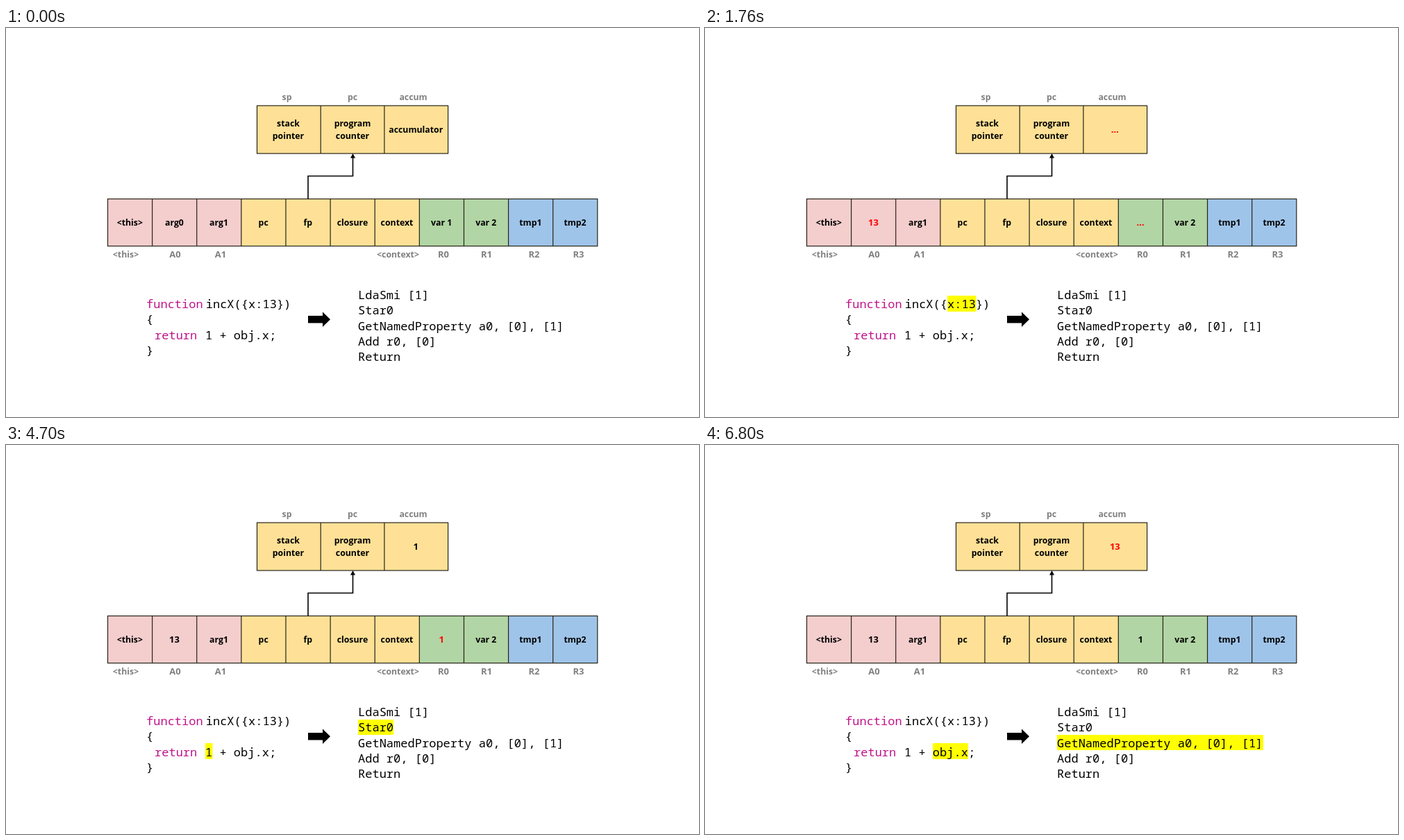
Recreate the animation shown at these times as an HTML page with a canvas. Size 998 by 561 pixels, loop 8000 ms.

```html
<!DOCTYPE html>
<html lang="en">
<head>
<meta charset="utf-8">
<title>Register machine</title>
<style>
html, body { margin: 0; width: 100%; height: 100%; overflow: hidden; background: #fff; }
canvas { display: block; width: 998px; height: 561px; }
</style>
</head>
<body>
<canvas id="stage"></canvas>
<script>
const canvas = document.getElementById('stage');
const ratio = window.devicePixelRatio || 1;
canvas.width = Math.round(998 * ratio);
canvas.height = Math.round(561 * ratio);
const ctx = canvas.getContext('2d');
ctx.scale(ratio, ratio);

const LOOP = 8000;
const SANS = '"Open Sans", "Noto Sans", sans-serif';
const MONO = '"Noto Sans Mono", "DejaVu Sans Mono", monospace';
const PINK = '#f4cdcd', GOLD = '#fee196', GREEN = '#b1d5a4', BLUE = '#9fc4e9';
const INK = '#000', RED = '#f00', GREY = '#808080', KEYWORD = '#c0148a';

// hot: the value that was just written; marks: highlighted code [x, y, w, h]
const steps = [
  { at: 0, arg: 'arg0', acc: 'accumulator', reg: 'var 1', hot: '', marks: [] },
  { at: 500, arg: '13', acc: '…', reg: '…', hot: 'arg acc reg',
    marks: [[349, 386, 41.5, 23]] },
  { at: 2600, arg: '13', acc: '1', reg: '…', hot: 'acc',
    marks: [[287, 430, 10.5, 23], [507, 374, 102.5, 22]] },
  { at: 4700, arg: '13', acc: '1', reg: '1', hot: 'reg',
    marks: [[287, 430, 10.5, 23], [507, 396, 51, 22]] },
  { at: 6800, arg: '13', acc: '13', reg: '1', hot: 'acc',
    marks: [[328, 430, 51, 23], [507, 418, 297, 22]] }
];

const code = [
  ['function', 202, 404, KEYWORD], ['incX({x:13})', 287.7, 404],
  ['{', 202, 426], ['return', 214, 448.5, KEYWORD],
  ['1 + obj.x;', 287, 448.5], ['}', 202, 471],
  ['LdaSmi [1]', 507, 391], ['Star0', 507, 413],
  ['GetNamedProperty a0, [0], [1]', 507, 435.5],
  ['Add r0, [0]', 507, 458], ['Return', 507, 480]
];

const topLabels = [['sp', 404.5], ['pc', 499], ['accum', 586.5]];
const rowLabels = [
  ['<this>', 172.5], ['A0', 243.5], ['A1', 309], ['<context>', 564.5],
  ['R0', 630], ['R1', 692], ['R2', 760.5], ['R3', 824.5]
];

function label(text, x, y, color = INK) {
  const size = /^([AR]?\d+|…)$/.test(text) ? 13 : 12.3;
  ctx.font = `700 ${size}px ${SANS}`;
  ctx.textAlign = 'center';
  ctx.fillStyle = color;
  ctx.fillText(text, x, y);
}

function mono(text, x, y, color = INK) {
  ctx.font = `400 17.05px ${MONO}`;
  ctx.textAlign = 'left';
  ctx.fillStyle = color;
  ctx.fillText(text, x, y);
}

function cells(x, y, w, h, fills) {
  fills.forEach((fill, i) => {
    ctx.fillStyle = fill;
    ctx.fillRect(x + i * w, y, w, h);
  });
  ctx.strokeStyle = '#262419';
  ctx.lineWidth = 1.2;
  ctx.strokeRect(x, y, w * fills.length, h);
  ctx.beginPath();
  for (let i = 1; i < fills.length; i++) {
    ctx.moveTo(x + i * w, y);
    ctx.lineTo(x + i * w, y + h);
  }
  ctx.stroke();
}

function trace(points) {
  ctx.beginPath();
  points.forEach(([x, y]) => ctx.lineTo(x, y));
}

function connector() {
  ctx.strokeStyle = ctx.fillStyle = INK;
  ctx.lineWidth = 1.6;
  trace([[435, 246.5], [435, 213.5], [499.5, 213.5], [499.5, 186]]);
  ctx.stroke();
  trace([[499.5, 181], [503, 187.5], [496, 187.5]]);
  ctx.fill();
}

function blockArrow() {
  ctx.fillStyle = INK;
  trace([[435, 415], [456, 415], [456, 409.5], [467, 420.3],
         [456, 431], [456, 425.5], [435, 425.5]]);
  ctx.fill();
}

function draw(step) {
  const tint = key => step.hot.includes(key) ? RED : INK;
  ctx.fillStyle = '#fff';
  ctx.fillRect(0, 0, 998, 561);

  cells(361.5, 112, 91.7, 69, Array(3).fill(GOLD));
  topLabels.forEach(([text, x]) => label(text, x, 103.5, GREY));
  label('stack', 406.5, 142);
  label('pointer', 406.5, 160);
  label('program', 499, 142);
  label('counter', 499, 160);
  label(step.acc, 590.3, 151, tint('acc'));

  cells(146.5, 246.5, 64.12, 68, [
    PINK, PINK, PINK, GOLD, GOLD, GOLD, GOLD, GREEN, GREEN, BLUE, BLUE
  ]);
  const values = ['<this>', step.arg, 'arg1', 'pc', 'fp', 'closure', 'context',
                  step.reg, 'var 2', 'tmp1', 'tmp2'];
  values.forEach((text, i) => {
    const color = i === 1 ? tint('arg') : i === 7 ? tint('reg') : INK;
    label(text, 178.3 + i * 64.12, 285, color);
  });
  rowLabels.forEach(([text, x]) => label(text, x, 331, GREY));
  connector();
  blockArrow();

  ctx.fillStyle = '#ff0';
  step.marks.forEach(mark => ctx.fillRect(...mark));
  code.forEach(line => mono(...line));
}

function tick() {
  const t = performance.now() % LOOP;
  draw(steps.findLast(step => t >= step.at));
  requestAnimationFrame(tick);
}
tick();
</script>
</body>
</html>
```
